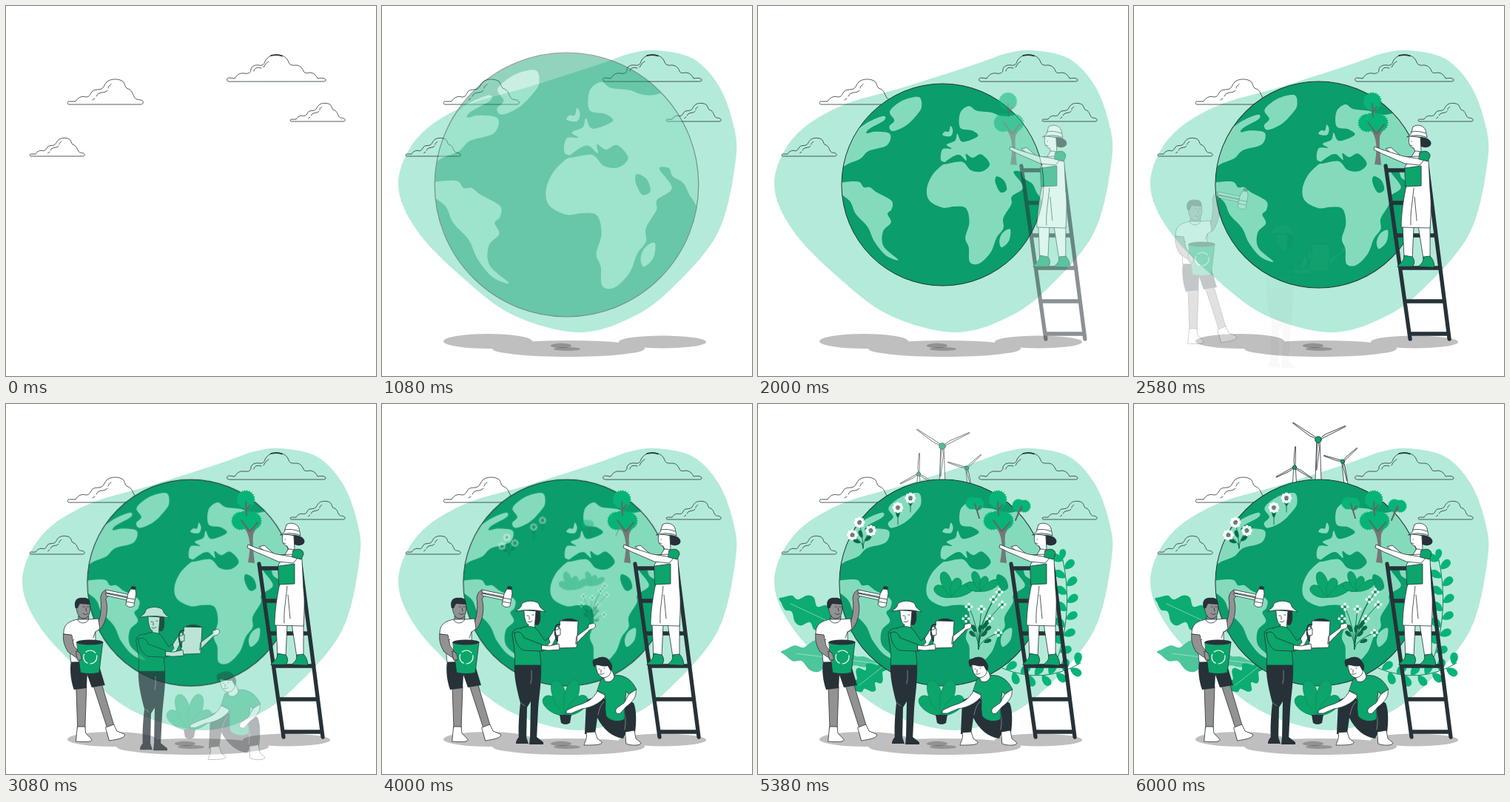
Animation, 500 px wide and 500 px high, one loop 6.04 s. Source, as an HTML page:

```html
<!DOCTYPE html>
<html>
<head>
<meta charset="utf-8">
<style>
html, body { margin: 0; width: 100%; height: 100%; overflow: hidden; background: #fff; }
svg { display: block; width: 100vw; height: 100vh; }
path, circle { stroke-linejoin: round; stroke-linecap: round; }
.w, .go, .s, .l { stroke: #263238; stroke-width: .8; }
.w { fill: #fff; }
.k { fill: #263238; }
.go { fill: #0ca56b; }
.s { fill: #929292; }
.l { fill: none; }
.g { fill: #06b478; }
.p { fill: none; stroke: #fff; stroke-width: .6; opacity: .65; }
.dg { fill: none; stroke: #0a6b48; stroke-width: .9; }
.trunk { fill: none; stroke: #666; stroke-width: 2; }
.sea { fill: #0b9d6b; }
.land { fill: #84dbbc; }
.bar { fill: none; stroke: #263238; stroke-width: 5.3; }
</style>
</head>
<body>
<svg viewBox="0 0 500 500">
<defs>
  <clipPath id="disc"><circle cx="250" cy="241.5" r="178"/></clipPath>
  <g id="cloud" class="l">
    <path vector-effect="non-scaling-stroke" d="M2,0C-1,0 0,-5 3,-4L11,-4C14,-9 19,-12 25,-10C30,-10 31,-14 33,-17C36,-21 41,-19 46,-21C50,-23 50,-28 54,-31C59,-35 70,-35 75,-31C78,-28 77,-25 80,-22C88,-19 87,-16 90,-11C92,-6 95,-7 99,-6C103,-5 104,0 99,0Z"/>
    <path vector-effect="non-scaling-stroke" d="M59,-27C56,-25 55,-24 55,-22M54,-19C52,-15 44,-17 41,-14L39,-11M37,-8L34,-6"/>
  </g>
</defs>

<g id="ground">
  <path fill="#b4ead9" data-curve="22,240 48,178 110,136 198,109.5 290,80 336,64 372,60 420,71 454,106 474,157 478,208 454,306 390,383 335,422 265,441 178,418 110,368 47,303"/>
  <g fill="#bfbfbf"><ellipse cx="143" cy="453" rx="60" ry="10"/><ellipse cx="379" cy="454" rx="59" ry="8.5"/><ellipse cx="252" cy="463" rx="103" ry="11"/></g>
  <g fill-opacity=".23"><ellipse cx="242" cy="459" rx="14" ry="3.3"/><ellipse cx="250" cy="463.5" rx="18" ry="2.6"/></g>
</g>

<use href="#cloud" x="83" y="133"/>
<use href="#cloud" transform="translate(32 203)scale(.725)"/>
<use href="#cloud" transform="translate(384 156)scale(.725)"/>
<path class="l" d="M301,102C297,101 298,97 302,97L309,98C312,93 316,90 322,91C328,92 331,90 331,86C331,82 336,79 342,80C346,81 349,79 350,75C353,69 358,66 366,66C375,66 380,70 382,76C384,81 388,80 392,80C398,80 401,85 402,88C404,92 408,90 412,90C417,91 420,95 421,98C425,97 432,97 432,100C432,102 430,102 428,102ZM355,75C350,78 350,80 348,83M345,84C338,82 336,84 335,88"/>
<path class="l" style="stroke-width:1.6" d="M358,67Q366,65 373,67.5"/>

<g id="leaves"></g>
<g id="mills"></g>

<g id="globe"><g transform="translate(249.5 241.5)scale(.784)translate(-250 -241.5)">
  <circle class="sea" cx="250" cy="241.5" r="178"/>
  <g class="land" clip-path="url(#disc)">
    <path data-curve="157,112 180,93 208,87 213,104 205,118 186,137 163,147 156,139 165,128"/>
    <path data-curve="60,215 85,204 105,196 120,182 152,172 157,152 132,148 116,151 121,143 147,128 144,121 110,137 60,180"/>
    <path data-curve="60,240 100,236 111,246 122,246 134,255 160,270 160,285 153,293 159,308 145,324 146,350 172,374 150,366 130,342 118,316 97,293 86,270 60,250"/>
    <path data-curve="281,141 281,115 296,103 310,111 335,114 362,121 440,120 440,275 419,260 408,240 393,230 388,219 375,220 392,246 372,262 371,276 357,300 357,318 345,335 335,360 315,380 298,378 296,352 290,335 297,308 291,283 270,280 250,282 227,270 222,250 231,226 248,208 258,203 247,198 250,179 266,178 257,171 272,164 276,152 285,166 312,156 302,146"/>
    <path data-curve="264,138 268,146 264,156 250,154 254,148 261,148"/>
    <path data-curve="369,320 367,340 354,352 350,340 356,326"/>
  </g>
  <g class="sea">
    <path data-curve="253,205 268,192 280,189 292,199 291,187 303,194 318,188 333,205 320,218 300,216 284,201"/>
    <path data-curve="345,227 358,234 363,250 352,255 343,238"/>
  </g>
  <circle class="l" style="stroke-width:1.3" cx="250" cy="241.5" r="178"/>
</g></g>

<g id="garden"></g>

<g id="ladder">
  <path class="bar" d="M342,216L375,450M398,216L428,450M343,222H398M350,266H404M356,310H410M362,354H416M368,399H421M374,443H427"/>
  <path fill="#777" d="M327,214C331,195 330,182 325,172L317,160L327,169L330,158L332,170L342,160L334,176C333,190 335,205 336,215Z"/>
  <g id="crown"></g>
  <path class="trunk" d="M329,172L318,157M330,172L340,160M325,150L324,132M324,144L330,136"/>
  <path class="w" d="M365,297L367,342H378L380,297ZM386,297L393,342H402L402,297Z"/>
  <path class="go" d="M358,352C362,346 367,346 367,337L378,339C382,344 381,350 378,352ZM386,352C391,348 393,346 393,339L402,338C406,342 409,350 407,353Z"/>
  <path class="k" d="M386,177C398,176 407,183 402,189C397,193 389,191 386,187Z"/>
  <path class="w" d="M374,176C372,185 374,191 380,192L382,197L390,197L389,178Z"/>
  <path class="w" d="M376,173L379,163C386,159 394,162 396,168L398,178C390,174 380,174 371,177Z"/>
  <path class="l" d="M377,170Q386,168 396,172M377,183h.5M375,188l3,1"/>
  <path class="w" d="M382,196C392,196 398,200 400,210L402,250C404,265 403,285 402,300L363,299C363,280 367,255 370,243L368,218Z"/>
  <path class="go" d="M368,219L390,216L390,243L369,244Z"/>
  <path class="l" d="M380,246C378,268 375,280 376,296M381,258L384,290"/>
  <path class="w" d="M390,203L364,204L349,191L342,193L352,201L363,209L386,209Z"/>
  <path class="w" d="M396,206L388,215L368,213L338,200L326,194L327,190L340,195L366,203L384,206Z"/>
  <path class="go" d="M388,198C396,194 402,197 402,203L399,210L387,207Z"/>
</g>

<g id="man">
  <path class="s" d="M95,382L97,440H107L109,382ZM118,380L137,438L146,434L130,380Z"/>
  <path class="w" d="M97,436H107L108,445L116,453C117,457 108,457 95,456ZM135,437L146,433L150,442L160,446C163,451 152,453 140,455Z"/>
  <path class="k" d="M88,348L125,350L134,380L116,383L110,366L109,384L92,386C88,375 86,360 88,348Z"/>
  <path class="s" d="M98,287L99,295H111L112,287Z"/>
  <path class="s" d="M123,300C128,290 130,275 128,262C129,254 134,250 139,252L140,258L135,263C140,280 134,298 127,305Z"/>
  <path class="w" d="M97,291L112,291L125,290L127,304L121,308L122,348L88,349C86,335 88,322 85,312L78,311C78,300 82,294 97,291Z"/>
  <path class="l" d="M97,292C101,298 109,297 112,291M88,322L92,318M121,308L118,316"/>
  <path class="s" d="M95,270C95,282 98,290 106,290C113,289 115,280 113,268Z"/>
  <path class="k" d="M94,276C91,266 96,261 104,262C111,261 115,266 113,271L100,270L97,276Z"/>
  <path class="l" d="M104,274h2M110,274h2M108,275l1,5M104,283q4,3 7,0"/>
  <path class="w" d="M135,251L173,259V262L136,255ZM135,256L173,264V267L136,259Z"/>
  <path class="w" d="M169,250H175L176,256L173,273C169,276 164,274 162,271L165,257Z"/>
  <path class="k" d="M170,246L176,247L175,251L169,250Z"/>
  <path class="l" d="M163,262L174,264M163,267L173,269"/>
  <path class="s" d="M78,311L89,312L92,327L101,338L97,344L84,335C78,325 77,318 78,311Z"/>
  <path class="go" d="M96,322H131L126,363Q113,366 101,363Z"/>
  <ellipse class="k" cx="113.5" cy="322" rx="18" ry="3.5"/>
  <circle fill="none" stroke="#fff" stroke-width="1.2" stroke-dasharray="14 4" cx="114" cy="342" r="9"/>
  <path class="s" d="M95,334C99,334 103,339 102,346L97,346Z"/>
</g>

<g id="woman">
  <path class="k" d="M179,351L215,350C216,375 212,395 211,412L209,453H200L201,402L196,410L195,453H185C184,440 185,420 187,404C182,385 178,368 179,351Z"/>
  <path class="k" d="M185,450H195L198,459H181Q181,454 185,450ZM200,450H209L218,457V460H199Z"/>
  <path class="p" d="M201,378Q203,370 202,360M188,404L193,408M197,412L197,446"/>
  <path class="k" d="M203,277H213C215,285 215,297 210,299C206,299 204,292 203,288Z"/>
  <path class="w" d="M192,279C192,290 195,298 198,298L197,304H206L208,280Z"/>
  <path class="w" d="M181,280C185,276 188,276 189,270C194,265 207,265 212,270C213,276 217,277 221,281Q201,276 181,280Z"/>
  <path class="l" d="M196,286h2M203,285h2M199,287v4M197,294q4,2 6,-1"/>
  <path class="w" d="M212,318L222,322L236,300L241,304L230,326L218,333Z"/>
  <path class="go" d="M188,303C194,299 206,300 210,305L220,320L225,316L227,322L217,334L213,332L215,353L179,353C181,340 178,325 176,312C176,306 180,303 188,303Z"/>
  <path class="w" d="M241,293H265L263,329L236,330ZM263,314L279,302L279,298L286,296C290,298 289,302 285,304L281,305L262,324Z"/>
  <path class="k" d="M242,293C248,288 260,289 265,294Z"/>
  <path class="l" style="stroke-width:2" d="M240,298C233,296 232,310 237,320"/>
  <path class="go" d="M179,309C186,306 190,310 192,316L216,325V334L192,333C184,330 179,320 179,309Z"/>
  <path class="w" d="M216,326L226,327L239,324L240,332L225,333L216,332ZM234,306L241,303V312L236,313Z"/>
</g>

<g id="sitter">
  <g id="pot"></g>
  <path class="k" d="M240,420H256L254,431Q248,435 242,431Z"/>
  <path class="k" d="M300,398C290,396 280,396 276,402L274,446L288,446L291,424C299,440 311,450 326,452L330,444H342C344,430 344,412 340,404C330,398 312,400 300,398Z"/>
  <path class="w" d="M276,444L288,443L291,452L297,457C298,461 285,461 273,461C274,456 278,452 276,444ZM329,443L341,441L343,452L350,458C350,462 335,462 330,459Z"/>
  <path class="p" d="M292,420Q294,408 300,402M328,440Q331,424 326,412"/>
  <path class="go" d="M296,372C304,366 322,365 328,369C336,372 341,380 344,386L334,393L330,388L328,406L328,426C318,431 308,428 303,422C300,408 304,400 300,391L291,388Z"/>
  <path class="w" d="M298,366L301,374C306,378 313,374 314,368L310,358Z"/>
  <path class="w" d="M289,353C290,364 294,369 300,370C307,369 311,363 310,354L305,347H292Z"/>
  <path class="k" d="M287,356C283,349 284,344 290,344C296,340 305,341 308,348C312,352 312,358 309,361L305,354C298,356 292,352 289,353Z"/>
  <path class="l" d="M293,358h1M300,357h1M296,359v4M294,365q4,1 6,-1"/>
  <path class="w" d="M291,388L302,394C298,402 285,410 270,412L256,418L249,418V414L262,408C275,404 285,400 291,388Z"/>
  <path class="w" d="M334,392L343,386C345,396 337,404 330,409L322,418C317,420 314,416 317,411L327,404Z"/>
</g>
</svg>
<script>
const $ = id => document.getElementById(id);
const range = n => [...Array(n).keys()];
const repeat = (n, draw) => range(n).map(draw).join('');
const path = (d, attrs) => `<path d="${d}" ${attrs}/>`;
const place = (x, y, deg) => `transform="translate(${x} ${y})rotate(${deg})"`;
const dot = (x, y, r, fill) => `<circle cx="${x}" cy="${y}" r="${r}" fill="${fill}"/>`;

// Closed smooth curve through the given points
function curve(pts) {
  const at = i => pts[(i + pts.length) % pts.length];
  const near = (p, a, b) => [0, 1].map(k => p[k] + (b[k] - a[k]) / 6);
  return 'M' + pts[0] + pts.map((p, i) =>
    `C${near(p, at(i - 1), at(i + 1))} ${near(at(i + 1), at(i + 2), p)} ${at(i + 1)}`).join('') + 'Z';
}
for (const el of document.querySelectorAll('[data-curve]'))
  el.setAttribute('d', curve(el.dataset.curve.split(' ').map(p => p.split(',').map(Number))));

const leaf = (x, y, len, w, deg, attrs) =>
  path(`M0,0C${len * .3},${-w} ${len},${-w} ${len},0C${len},${w} ${len * .3},${w} 0,0Z`, `${place(x, y, deg)} ${attrs}`);

// Leaf with a wavy outline and a midrib
function lobed(x, y, len, w, deg, fill) {
  const side = sign => range(12).map(i => {
    const t = (i + .5) / 12;
    return [len * t, sign * w * Math.sin(Math.PI * t ** 1.4) * (i % 3 ? 1.05 : .6)];
  });
  const outline = [[0, 0], ...side(-1), [len, 0], ...side(1).reverse()];
  return `<g ${place(x, y, deg)}>${path(curve(outline), `fill="${fill}"`)}${path(`M0,0H${len * .85}`, 'class="p"')}</g>`;
}

// Curved stem with leaves on alternating sides
function vine(x0, y0, cx, cy, x1, y1, n) {
  const mix = (a, b, c, t) => (1 - t) ** 2 * a + 2 * t * (1 - t) * b + t * t * c;
  return path(`M${x0},${y0}Q${cx},${cy} ${x1},${y1}`, 'class="dg"') + repeat(n, i => {
    const t = (i + .5) / n;
    const dir = Math.atan2((1 - t) * (cy - y0) + t * (y1 - cy), (1 - t) * (cx - x0) + t * (x1 - cx)) * 180 / Math.PI;
    return leaf(mix(x0, cx, x1, t), mix(y0, cy, y1, t), 17, 7, dir + (i % 2 ? 55 : -55), 'class="g"');
  });
}
$('leaves').innerHTML =
  lobed(130, 310, 112, 20, 205, '#0cac72') + lobed(172, 352, 142, 20, 187, '#4cc69a') + lobed(180, 346, 66, 18, 142, '#0cac72') +
  vine(402, 352, 428, 280, 411, 206, 13) + leaf(411, 210, 14, 6, -85, 'class="g"') + vine(330, 357, 385, 380, 436, 350, 11);

// Foliage ball with a ragged edge
const fuzz = (x, y, r) => path('M' + range(44).map(i => {
  const a = i * Math.PI / 22, q = r * (i % 2 ? .86 : 1);
  return [x + q * Math.cos(a), y + q * Math.sin(a)];
}).join('L') + 'Z', 'class="g"');
const tree = (x, y, lean) => fuzz(x - 4, y - 1, 9) + fuzz(x + 4, y, 9) +
  path(`M${x},${y}L${x + lean},${y + 19}M${x + lean / 2},${y + 9}l5,-6`, 'class="trunk"');
$('crown').innerHTML = fuzz(324, 129, 13) + repeat(3, i => fuzz(317 + 8 * i, 158 - 2 * (i % 2), 13));

function flower(x, y, n, r, heart) {
  return repeat(n, i => {
    const a = i * 2 * Math.PI / n;
    return dot(x + r * Math.cos(a), y + r * Math.sin(a), r * (n > 4 ? .42 : .5), '#fff');
  }) + dot(x, y, r * .5, heart);
}
// Stems fan out from one root, each with a leaf and a flower
const plant = (x, y, heads, ...look) => heads.map(([hx, hy]) =>
  path(`M${x},${y}Q${x},${(y + hy) / 2} ${hx},${hy}`, 'class="dg"') +
  leaf(x + (hx - x) * .25, y + (hy - y) * .4, 11, 3.5, Math.atan2(hy - y, (hx - x) * 2.5) * 180 / Math.PI, 'fill="#0a6b48"')
).join('') + heads.map(h => flower(...h, ...look)).join('');
const bush = (x, y, k, n = 4) => repeat(n, i =>
  leaf(x, y, k * (27 + 9 * (i % 2)), k * 9, -150 + i * 120 / (n - 1), 'class="go" style="stroke:#0a8f5e"'));
const daisy = [8, 5.3, '#777'], blossom = [4, 3.7, '#0a8f5e'];

$('garden').innerHTML =
  tree(293, 135, 6) + tree(356, 138, -8) +
  plant(142, 195, [[137, 160], [152.5, 171], [127.5, 177]], ...daisy) +
  plant(189, 163, [[189, 140]], ...daisy) + plant(206, 146, [[206, 127]], ...daisy) +
  bush(262, 261, 1) + bush(301, 253, .78) +
  plant(298, 331, [[285, 274], [326, 254], [318, 264], [330, 271], [302, 277], [281, 290], [313, 290], [325, 309]], ...blossom);
$('pot').innerHTML = repeat(4, i =>
  leaf(248, 421, 38 + 12 * (i > 0 && i < 3), 12, -140 + i * 33, 'class="go" style="stroke:#0a8f5e"'));

function mill(x, y, len, deg, foot, r) {
  return path(`M${x - r * .5},${y}L${foot - r},112H${foot + r}L${x + r * .5},${y}Z`, 'class="w"') +
    repeat(3, i => path(`M0,0L${len * .3},${-r * .5}L${len},-.4V.6L0,1Z`, `class="w" ${place(x, y, deg + 120 * i)}`)) +
    `<circle class="go" cx="${x}" cy="${y}" r="${r}"/>`;
}
$('mills').innerHTML = mill(217, 86, 28, -88, 217, 2.7) + mill(282, 78, 26.5, -43, 287, 2.7) + mill(249, 48.5, 41, -146.5, 249, 4.3);

// cubic-bezier(.36, -.01, .5, 1.38)
function ease(x) {
  if (x <= 0) return 0;
  if (x >= 1) return 1;
  const bezier = (s, a, b) => 3 * (1 - s) ** 2 * s * a + 3 * (1 - s) * s * s * b + s ** 3;
  let lo = 0, hi = 1;
  for (let i = 0; i < 24; i++) {
    const mid = (lo + hi) / 2;
    if (bezier(mid, .36, .5) < x) lo = mid; else hi = mid;
  }
  return bezier(lo, -.01, 1.38);
}
const slide = (dx, dy) => p => `translate(${dx * (1 - p)} ${dy * (1 - p)})`;
const zoom = (cx, cy, from) => p => {
  const k = from + (1 - from) * p;
  return `translate(${cx * (1 - k)} ${cy * (1 - k)})scale(${k})`;
};
const parts = [
  ['ground', 60, 1250, slide(0, 0)],
  ['globe', 505, 1610, zoom(249.5, 241.5, 1.5)],
  ['ladder', 1500, 1250, slide(30, 0)],
  ['man', 2240, 1250, slide(-30, 0)],
  ['woman', 2468, 1250, slide(0, 30)],
  ['sitter', 2690, 1250, slide(0, 30)],
  ['garden', 3581, 1250, zoom(242, 227, .5)],
  ['leaves', 4055, 1250, zoom(232, 293, .5)],
  ['mills', 4780, 1240, slide(0, 30)]
].map(([id, ...rest]) => [$(id), ...rest]);

function draw() {
  const t = performance.now() % 6040;
  for (const [el, start, len, move] of parts) {
    const p = ease((t - start) / len);
    el.setAttribute('opacity', Math.max(0, Math.min(1, p)));
    el.setAttribute('transform', move(p));
  }
  requestAnimationFrame(draw);
}
draw();
</script>
</body>
</html>
```
